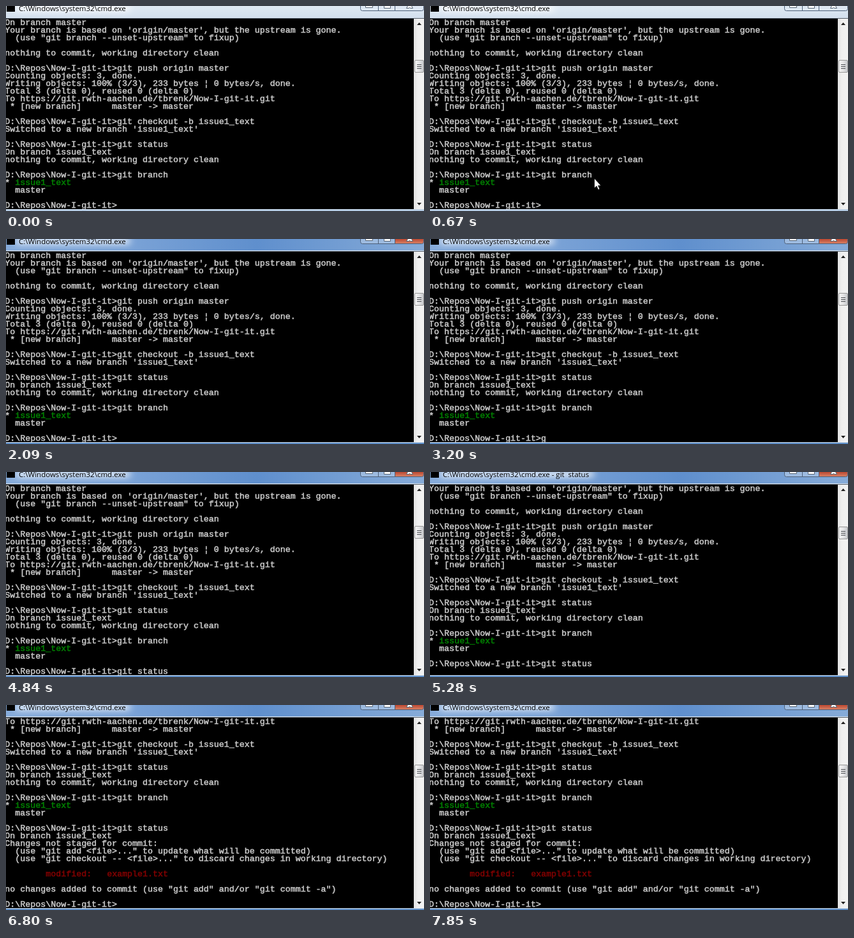
An HTML page for the animation above (8000 ms loop, 655 by 323 pixels).

```html
<!DOCTYPE html>
<html lang="en">
<head>
<meta charset="utf-8">
<title>Console</title>
<style>
  html, body { margin: 0; width: 100%; height: 100%; overflow: hidden; background: #000; }
  svg { display: block; width: 655px; height: 323px; }
  text { white-space: pre; }
  .console { font: 13.32px "Liberation Mono", monospace; fill: #c8c8c8; stroke: #c8c8c8; stroke-width: .55; }
  .green { fill: #008000; stroke: #008000; }
  .red { fill: #800000; stroke: #800000; }
  .title { font: 11.5px "Open Sans", sans-serif; fill: #000; }
</style>
</head>
<body>
<svg viewBox="0 0 655 323">
  <defs>
    <linearGradient id="idle" x2="0" y2="1">
      <stop stop-color="#dfe8f2"/><stop offset="1" stop-color="#d3e0ee"/>
    </linearGradient>
    <linearGradient id="active">
      <stop stop-color="#86abda"/><stop offset=".3" stop-color="#7aa2d6"/>
      <stop offset=".6" stop-color="#5f8fcd"/><stop offset="1" stop-color="#86abd8"/>
    </linearGradient>
    <linearGradient id="close" x2="0" y2="1">
      <stop stop-color="#b8402a"/><stop offset="1" stop-color="#d98468"/>
    </linearGradient>
    <linearGradient id="track">
      <stop stop-color="#e3e3e3"/><stop offset=".4" stop-color="#f0f0f0"/><stop offset="1" stop-color="#f3f3f3"/>
    </linearGradient>
    <linearGradient id="grip">
      <stop stop-color="#f5f5f5"/><stop offset=".5" stop-color="#e4e4e6"/><stop offset="1" stop-color="#c6c8cc"/>
    </linearGradient>
    <filter id="blur" x="-20%" y="-100%" width="140%" height="300%">
      <feGaussianBlur stdDeviation="6 4"/>
    </filter>
    <clipPath id="top"><rect width="655" height="18"/></clipPath>
  </defs>

  <rect width="655" height="323"/>
  <g clip-path="url(#top)">
    <rect id="bar" width="655" height="18"/>
    <rect id="glow" x="16" y="-4" height="14" fill="#fff" opacity=".6" filter="url(#blur)"/>
  </g>
  <rect y="18" width="655" height="1" fill="#dbe6f2"/>
  <rect y="19" width="655" height="1" fill="#505a66"/>
  <rect x="1" width="13" height="9"/>
  <text id="title" class="title" x="20" y="8"></text>

  <g stroke="#4c5f78">
    <path id="buttons" d="M555.5 -1V4.5Q555.5 7.5 558.5 7.5H609.5V-1M583.5 -1V7.5"/>
    <path id="cross" d="M609.5 -1V7.5H651.5Q654.5 7.5 654.5 4.5V-1"/>
  </g>
  <g fill="#fff" stroke="#566474">
    <path d="M563.5 -1H574.5V2.5H563.5Z"/>
    <path d="M592.5 -1H602.5V3.5H592.5Z"/>
    <path d="M627.5 3.5L630 -1H635L637.5 3.5H633.5L632.5 2L631.5 3.5Z"/>
  </g>

  <rect x="639" y="20" width="16" height="300" fill="url(#track)"/>
  <path d="M644 30H651L647.5 26ZM644 310H651L647.5 314Z" fill="#202020"/>
  <g id="thumb">
    <rect x="640.5" y=".5" width="14" height="19" rx="1.5" fill="url(#grip)" stroke="#979797"/>
    <path d="M644 7.5H651M644 10.5H651M644 13.5H651" stroke="#484b50"/>
  </g>

  <g id="screen" class="console" transform="translate(-.7 0)"></g>
  <rect id="cursor" y="317" width="8" height="3" fill="#c0c0c0"/>

  <rect y="320" width="655" height="1" fill="#c9d8e8"/>
  <rect id="edge" y="321" width="655" height="2"/>
  <path id="pointer" d="M.5 .5V16L4 12.8L6.6 18.5L9 17.5L6.5 12H11Z" fill="#fff" stroke="#000" stroke-width=".8"/>
</svg>

<script>
const LOOP = 8000, CELL = 8, LINE = 12, ROWS = 25, LEFT = -1;
const PROMPT = 'D:\\Repos\\Now-I-git-it>';
const TITLE = 'C:\\Windows\\system32\\cmd.exe';
const NS = 'http://www.w3.org/2000/svg';
const $ = id => document.getElementById(id);

const log = [
  'On branch master',
  "Your branch is based on 'origin/master', but the upstream is gone.",
  '  (use "git branch --unset-upstream" to fixup)',
  '',
  'nothing to commit, working directory clean',
  '',
  PROMPT + 'git push origin master',
  'Counting objects: 3, done.',
  'Writing objects: 100% (3/3), 233 bytes ¦ 0 bytes/s, done.',
  'Total 3 (delta 0), reused 0 (delta 0)',
  'To https://git.rwth-aachen.de/tbrenk/Now-I-git-it.git',
  ' * [new branch]      master -> master',
  '',
  PROMPT + 'git checkout -b issue1_text',
  "Switched to a new branch 'issue1_text'",
  '',
  PROMPT + 'git status',
  'On branch issue1_text',
  'nothing to commit, working directory clean',
  '',
  PROMPT + 'git branch',
  ['* ', 'issue1_text', 'green'],
  '  master',
  ''
];
const command = 'git status';
const output = [
  'On branch issue1_text',
  'Changes not staged for commit:',
  '  (use "git add <file>..." to update what will be committed)',
  '  (use "git checkout -- <file>..." to discard changes in working directory)',
  '',
  ['        ', 'modified:   example1.txt', 'red'],
  '',
  'no changes added to commit (use "git add" and/or "git commit -a")',
  '',
  PROMPT
];

// Each track holds [time, value] steps.
const typed = [[0, 0], [3200, 1], [3480, 2], [3600, 4], [4160, 5], [4310, 7], [4430, 8], [4570, 9], [4840, 10]];
const blink = [[0, 0], [1560, 1], [2090, 0], [2650, 1], [3080, 0], [3600, 1], [4310, 0],
  [4700, 1], [4840, 0], [6270, 1], [6800, 0], [7260, 1], [7850, 0]];
const mouse = [[0, null], [400, [174, 295]], [530, [207, 271]], [670, [257, 271]], [1680, null]];
const stage = [[0, 0], [5280, 1], [5430, 2]];
const at = (track, t) => track.findLast(step => step[0] <= t)[1];

const add = (parent, name, attrs, content = '') => {
  const el = document.createElementNS(NS, name);
  for (const key in attrs) el.setAttribute(key, attrs[key]);
  el.textContent = content;
  return parent.appendChild(el);
};

const rows = Array.from({ length: ROWS }, (_, i) =>
  add($('screen'), 'text', { x: LEFT, y: 30 + LINE * i }));

function setRow(row, line) {
  const key = String(line);
  if (row.key === key) return;
  row.key = key;
  if (typeof line === 'string') {
    row.textContent = line;
    return;
  }
  const [lead, text, color] = line;
  row.textContent = '';
  add(row, 'tspan', { x: LEFT + CELL * lead.length, class: color }, text);
  if (lead.trim()) add(row, 'tspan', { x: LEFT }, lead.trim());
}

function render(t) {
  const phase = at(stage, t);
  const entry = PROMPT + command.slice(0, at(typed, t));
  const extra = [[], [''], output][phase];
  const lines = [...log, entry, ...extra].slice(-ROWS);
  rows.forEach((row, i) => setRow(row, lines[i]));

  const column = (phase === 2 ? PROMPT : entry).length;
  $('cursor').setAttribute('x', LEFT + CELL * column);
  $('cursor').setAttribute('visibility', at(blink, t) ? 'visible' : 'hidden');

  const pos = at(mouse, t);
  $('pointer').setAttribute('visibility', pos ? 'visible' : 'hidden');
  if (pos) $('pointer').setAttribute('transform', `translate(${pos})`);

  const active = t >= 1100;
  $('bar').setAttribute('fill', active ? 'url(#active)' : 'url(#idle)');
  $('buttons').setAttribute('fill', active ? '#9dbbe0' : '#dde7f2');
  $('cross').setAttribute('fill', active ? 'url(#close)' : '#dde7f2');
  $('edge').setAttribute('fill', active ? '#5f8fc8' : '#b4cbe4');
  $('title').textContent = TITLE + (phase === 1 ? ' - git  status' : '');
  $('glow').setAttribute('width', phase === 1 ? 240 : 178);
  $('thumb').setAttribute('transform', `translate(0 ${[85, 86, 94][phase]})`);
}

function tick(now) {
  render(now % LOOP);
  requestAnimationFrame(tick);
}
render(0);
requestAnimationFrame(tick);
</script>
</body>
</html>
```
